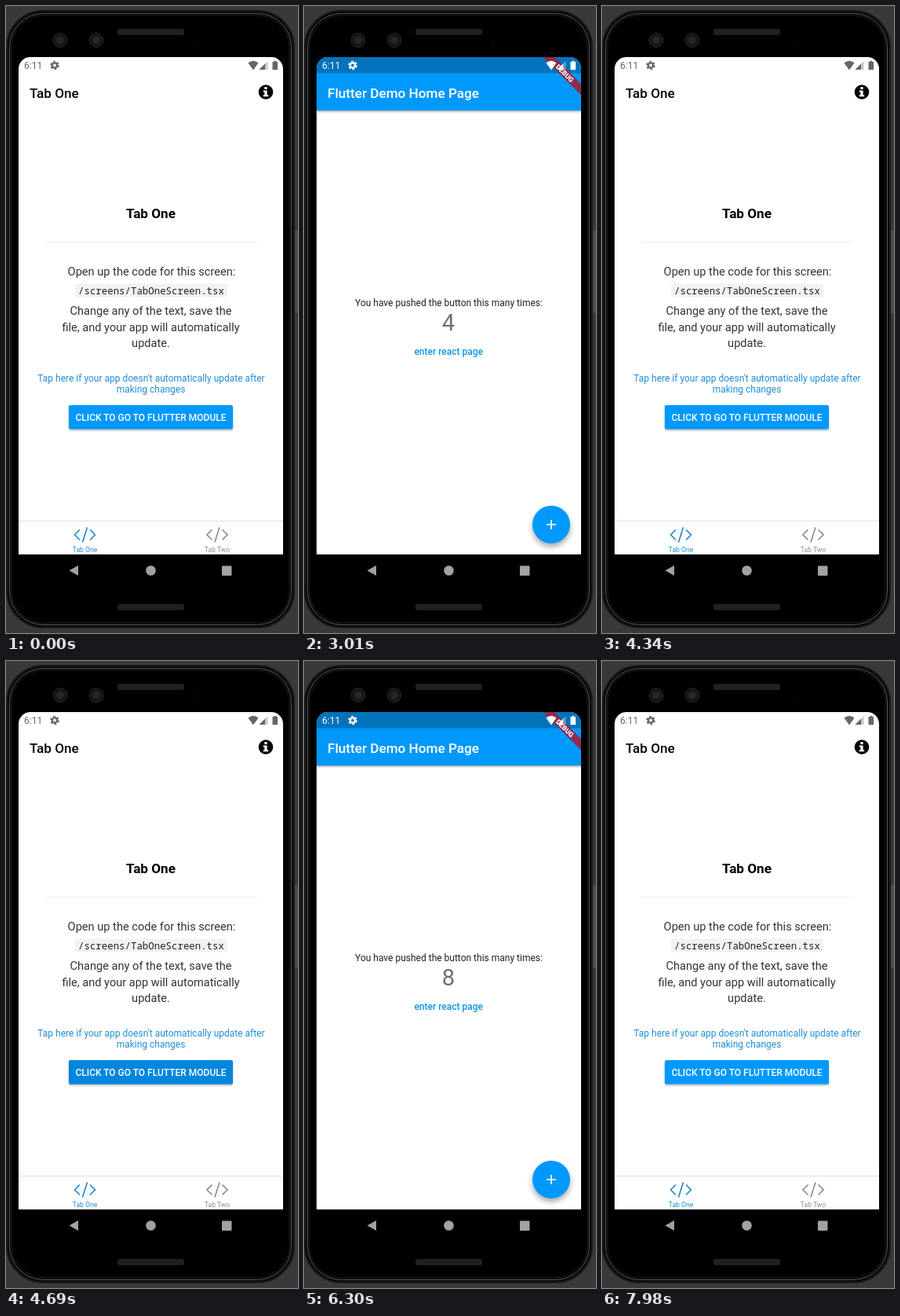
Animation, 372 px wide and 798 px high, one loop 8 s. Source, as an HTML page:

```html
<!DOCTYPE html>
<html lang="en">
<head>
<meta charset="utf-8">
<title>Phone demo</title>
<style>
  html, body { margin: 0; width: 100%; height: 100%; overflow: hidden; background: #393939; }
  svg { display: block; width: 372px; height: 798px; font: 12px Roboto, sans-serif; }
  .mid { text-anchor: middle; }
  .med { font-weight: 500; }
  .head { font-size: 17.15px; font-weight: 500; }
  .body { font-size: 14.6px; fill: #333; }
  .code { font: 12.4px "Noto Sans Mono", monospace; fill: #222; }
  .link { fill: #1f8ed2; }
  .tab { font-size: 8.6px; }
  .page { transform-origin: 184.5px 381px; }
  .line { fill: none; stroke-width: 1.7; }
</style>
</head>
<body>
<svg viewBox="0 0 372 798">
  <defs>
    <clipPath id="screen"><path d="M16 698V80a15 15 0 0 1 15-15H338a15 15 0 0 1 15 15V698z"/></clipPath>
    <clipPath id="buttonClip"><rect x="80" y="508" width="209" height="31" rx="2"/></clipPath>
    <filter id="shadow" x="-30%" y="-30%" width="160%" height="170%">
      <feDropShadow dx="0" dy="1.5" stdDeviation="1.3" flood-opacity=".35"/>
    </filter>
    <filter id="deep" x="-40%" y="-40%" width="180%" height="190%">
      <feDropShadow dx="0" dy="4" stdDeviation="3.5" flood-opacity=".35"/>
    </filter>
    <g id="brackets" class="line">
      <path d="M-6.500-6.500L-13 0l6.500 6.500M6.500-6.500L13 0L6.500 6.500M3-9.500L-3 9.500"/>
    </g>
  </defs>

  <!-- phone body -->
  <rect width="372" height="798" fill="#393939"/>
  <rect x="367" y="285" width="5" height="106" rx="2" fill="#4c4c4c"/>
  <rect x="1" y="6" width="366" height="785" rx="46" fill="#080808" stroke="#1b1b1b" stroke-width="2"/>
  <rect x="4.500" y="9.500" width="359" height="778" rx="43" fill="none" stroke="#565656"/>
  <rect x="7" y="12" width="354" height="773" rx="41" stroke="#1c1c1c"/>
  <g fill="#202020">
    <rect x="142" y="29" width="85" height="8" rx="3"/>
    <rect x="142" y="761" width="85" height="8" rx="3"/>
  </g>
  <g fill="#151515" stroke="#252525">
    <circle cx="69" cy="43.500" r="9"/><circle cx="115" cy="43.500" r="9"/>
    <circle cx="69" cy="43.500" r="4.500" fill="#25282a"/><circle cx="115" cy="43.500" r="4.500" fill="#25282a"/>
    <circle cx="244" cy="45" r="7" fill="#020202" stroke="#070707"/>
  </g>
  <g fill="#a2a2a2">
    <path d="M80.500 718.500L92 712v13z"/>
    <circle cx="184.500" cy="718.500" r="6.300"/>
    <rect x="275" y="712.500" width="12.500" height="12.500" rx="1"/>
  </g>

  <g clip-path="url(#screen)">
    <g id="tabs" class="page">
      <rect x="16" y="65" width="337" height="633" fill="#fff"/>
      <text class="head" x="30" y="116.500">Tab One</text>
      <circle cx="331" cy="109.500" r="9.300"/>
      <path d="M329.300 103h3.300v3h-3.300zM327.700 107.500h4.900v5.700h1.600v2.100h-6.500v-2.100h1.600v-3.600h-1.600z" fill="#fff"/>
      <text class="head mid" style="font-weight:700" x="184.500" y="269.500">Tab One</text>
      <path d="M50 300.500H320" stroke="#eee"/>
      <g class="mid body">
        <text x="185.500" y="343">Open up the code for this screen:</text>
        <text x="184.500" y="393">Change any of the text, save the</text>
        <text x="184.500" y="413.500">file, and your app will automatically</text>
        <text x="184.500" y="434">update.</text>
      </g>
      <rect x="88" y="353.500" width="194" height="17" rx="2.500" fill="#f2f2f2"/>
      <text class="mid code" x="185" y="366.500">/screens/TabOneScreen.tsx</text>
      <g class="mid link">
        <text x="185" y="477.500">Tap here if your app doesn't automatically update after</text>
        <text x="184.500" y="492">making changes</text>
      </g>
      <rect x="80" y="508" width="209" height="30.500" rx="2" fill="#0298fb" filter="url(#shadow)"/>
      <circle id="ripple" cx="185" cy="523" r="0" fill-opacity=".12" clip-path="url(#buttonClip)"/>
      <text class="mid med" x="184.500" y="528" fill="#fff">CLICK TO GO TO FLUTTER MODULE</text>
      <path d="M16 655.500H353" stroke="#e0e0e0"/>
      <use href="#brackets" x="100.500" y="673" stroke="#1f8ed2"/>
      <use href="#brackets" x="269" y="673" stroke="#8e8e8e"/>
      <text class="mid tab link" x="100.500" y="695">Tab One</text>
      <text class="mid tab" x="269" y="695" fill="#8e8e8e">Tab Two</text>
    </g>

    <g id="counter" class="page">
      <rect x="16" y="65" width="337" height="633" fill="#fff"/>
      <rect x="16" y="65" width="337" height="68" fill="#0298fb" filter="url(#shadow)"/>
      <rect x="16" y="65" width="337" height="20.500" fill="#0272bb"/>
      <text class="head" x="30" y="116.500" fill="#fff">Flutter Demo Home Page</text>
      <g transform="translate(353 65) rotate(45)">
        <rect x="-35" y="24" width="70" height="10.300" fill="#982444" fill-opacity=".93"/>
        <text class="mid" y="32.300" style="font-size:8.700px;font-weight:900" fill="#fff">DEBUG</text>
      </g>
      <text class="mid" x="184.500" y="382" fill="#222">You have pushed the button this many times:</text>
      <text id="count" class="mid" x="184" y="412.500" style="font-size:29.150px" fill="#707070">4</text>
      <text class="mid med" x="184.200" y="444" fill="#0f94e6">enter react page</text>
      <circle cx="315" cy="660" r="24" fill="#0298fb" filter="url(#deep)"/>
      <circle id="glow" cx="315" cy="660" r="24" fill="#3a98d8"/>
      <path d="M309 660h12M315 654v12" class="line" stroke="#fff"/>
    </g>

    <g id="status">
      <text x="23" y="80">6:11</text>
      <circle cx="62" cy="75.500" r="3.100" fill="none" stroke="currentColor" stroke-width="2.400"/>
      <circle cx="62" cy="75.500" r="4.900" fill="none" stroke="currentColor" stroke-width="1.800" stroke-dasharray="2.800 2.331"/>
      <path d="M315 81.500L308.500 72.500Q315 67 321.500 72.500z"/>
      <path d="M333.500 70v11h-11z" fill-opacity=".35"/>
      <path d="M330 73.500V81h-7.500z"/>
      <path d="M339.500 71h2v-1.200h2.600V71h2v10.300h-6.600z"/>
    </g>
  </g>
</svg>
<script>
  const LOOP = 8000, STEP = 70;
  const $ = id => document.getElementById(id);
  const clamp = x => Math.min(1, Math.max(0, x));
  const ease = x => 1 - (1 - x) ** 3;
  const ramp = (t, start, length) => ease(clamp((t - start) / length));

  const presses = [1400, 4340];
  const closes = [3325, 6755];
  const taps = [5600, 5810, 5950, 6160];

  function draw(ms) {
    const t = ms - ms % STEP;

    // 0 = tabs page, 1 = counter page
    let open = 0;
    presses.forEach((p, i) => open += ramp(t, p + 385, 175) - ramp(t, closes[i], 385));
    $("tabs").style.transform = `scale(${1 + .1 * open})`;
    $("counter").style.transform = `scale(${.88 + .12 * open})`;
    $("counter").style.opacity = clamp(open * 1.6);
    $("status").style.fill = $("status").style.color = open > .5 ? "#fff" : "#666";

    const press = presses.find(p => t >= p && t < p + 560);
    $("ripple").setAttribute("r", press === undefined ? 0 : 120 * clamp((t - press) / 280));

    $("count").textContent = 4 + taps.filter(s => t >= s).length;
    $("glow").style.opacity = t < taps[0] ? 0 : .6 * clamp((6300 - t) / 140);
  }

  const start = performance.now();
  function tick() {
    draw((performance.now() - start) % LOOP);
    requestAnimationFrame(tick);
  }
  tick();
</script>
</body>
</html>
```
